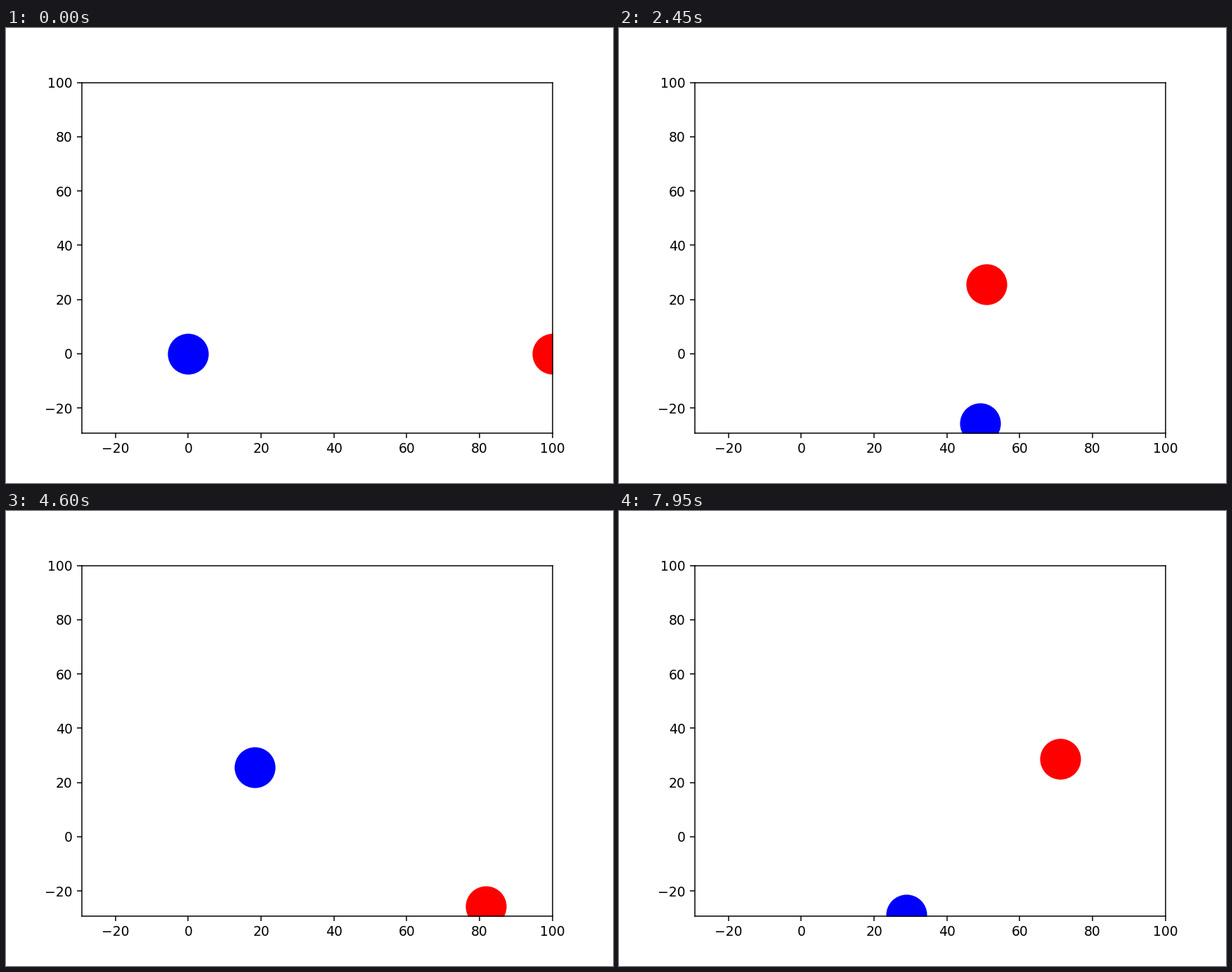
Write a matplotlib script that moves like this. It is 864 px wide and 648 px high and loops after 8000 ms.

```python
import matplotlib.pyplot as plt
import numpy as np
from matplotlib.animation import FuncAnimation

FRAMES = 160
INTERVAL = 50
PULL = 400.0  # gravitational constant times the mass of either body


def simulate(steps):
    """Positions of two equal bodies, one row per step: [body, axis]."""
    pos = np.array([[0.0, 0.0], [100.0, 0.0]])
    vel = np.array([[0.0, -1.0], [0.0, 1.0]])
    path = [pos.copy()]
    for _ in range(steps - 1):
        pos += vel
        gap = pos[1] - pos[0]
        acc = PULL * gap / np.hypot(*gap) ** 3
        vel += np.array([acc, -acc])
        path.append(pos.copy())
    return np.array(path)


path = simulate(FRAMES)
limits = (path.min(), 100)

fig, ax = plt.subplots(figsize=(6.4, 4.8), dpi=135)
ax.set_xlim(*limits)
ax.set_ylim(*limits)
bodies = [ax.plot([], [], "o", color=c, markersize=30)[0] for c in ("blue", "red")]


def update(frame):
    for body, (x, y) in zip(bodies, path[frame]):
        body.set_data([x], [y])
    return bodies


def init():
    return update(0)


anim = FuncAnimation(fig, update, frames=FRAMES, init_func=init,
                     interval=INTERVAL, repeat=True, repeat_delay=0)
plt.show()
```
